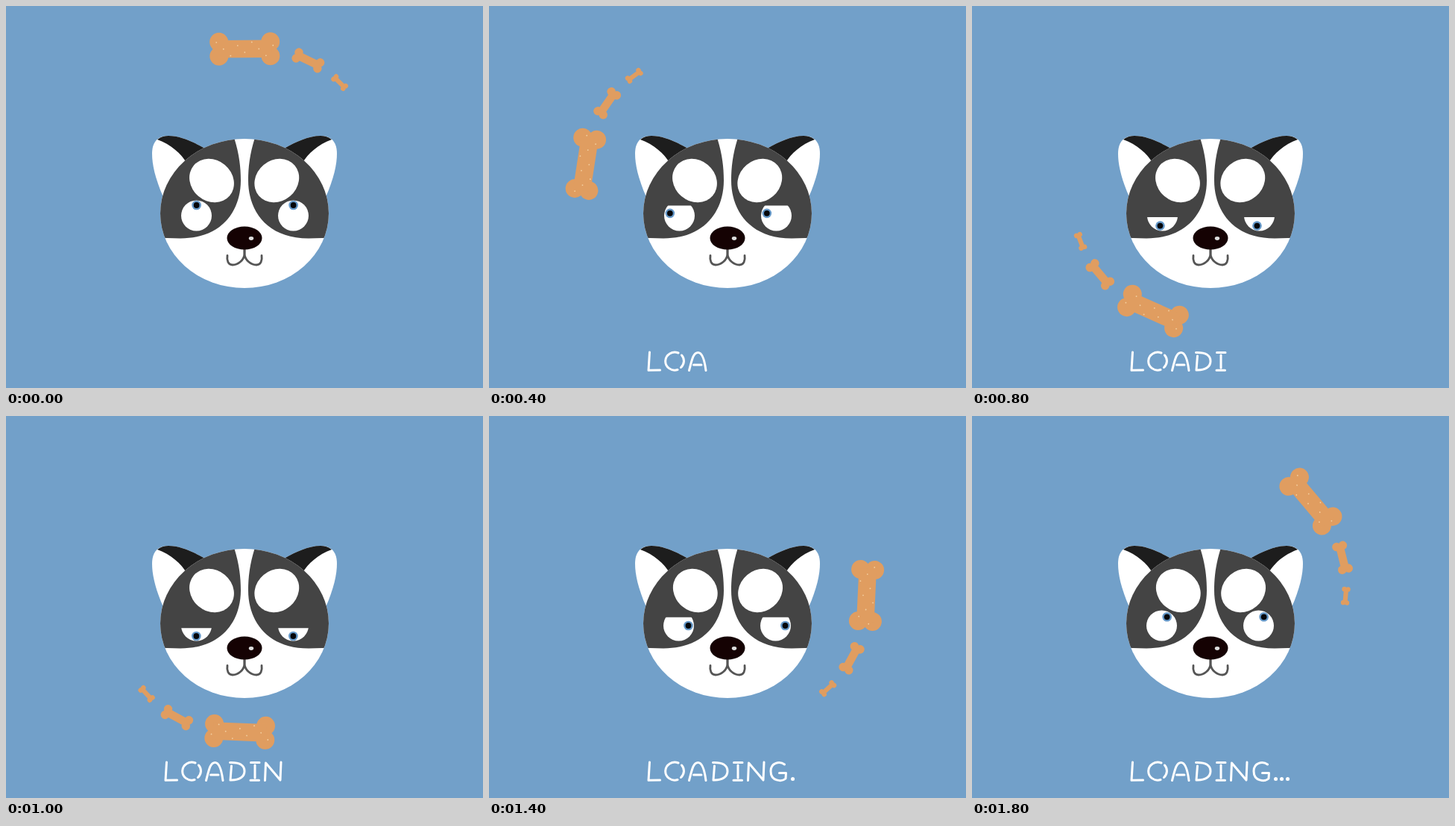
Write an HTML page that moves like this. It is 640x512 px and loops after 2 s.

```html
<!DOCTYPE html>
<html lang="en">
<head>
<meta charset="utf-8">
<title>Loading</title>
<style>
html, body { margin: 0; width: 100%; height: 100%; overflow: hidden; background: #72a0c9; }
svg { display: block; width: 640px; height: 512px; }
.line { fill: none; stroke-linecap: round; stroke-linejoin: round; }
</style>
</head>
<body>
<svg viewBox="0 0 640 512" role="img" aria-label="LOADING...">
  <defs>
    <clipPath id="skull"><ellipse cx="320" cy="278" rx="113" ry="100"/></clipPath>
    <clipPath id="open"><rect id="lid" x="200" width="240" height="60"/></clipPath>
    <g id="bone">
      <circle cx="-34.5" cy="-9.5" r="12.5"/><circle cx="-34.5" cy="9.5" r="12.5"/>
      <circle cx="34.5" cy="-9.5" r="12.5"/><circle cx="34.5" cy="9.5" r="12.5"/>
      <rect x="-36" y="-11.8" width="72" height="23.6"/>
    </g>
    <g id="ear">
      <path fill="#fff" d="M211 256C200 231 196 212 196 198C196 184 202 174 218 174C234 174 251 182 267 191L260 240Z"/>
      <path fill="#1d1d1d" d="M203 179C208 175 213 174 218 174C234 174 251 182 267 191L262 210H242C235 198 222 186 203 179Z"/>
    </g>
    <path id="patch" fill="#444" d="M306.5 170V178C313 199 315 216 315 234C315 272 292 311.500 234 311.500L200 310.500V170Z"/>
    <ellipse id="brow" cx="276" cy="234" rx="31.500" ry="27.500" transform="rotate(40 276 234)"/>
    <path id="lip" d="M320 326V333C319 341 311 347 304 347C298 347 296 341 297 334.500"/>
    <g id="eye">
      <circle id="white" cx="255.500" cy="281" r="20.500" fill="#fff"/>
      <g id="pupil"><circle r="6.300" fill="#6598c8"/><circle r="3.900" fill="#05060a"/></g>
    </g>
  </defs>

  <g id="bones" fill="#e09d60">
    <use href="#bone"/>
    <g id="specks" fill="#f3cfa0"></g>
    <use href="#bone" transform="translate(85 16) rotate(26) scale(.46)"/>
    <use href="#bone" transform="translate(127 46) rotate(45) scale(.26)"/>
  </g>

  <use href="#ear"/>
  <use href="#ear" transform="matrix(-1 0 0 1 640 0)"/>
  <g clip-path="url(#skull)">
    <rect x="200" y="170" width="240" height="215" fill="#fff"/>
    <use href="#patch"/>
    <use href="#patch" transform="matrix(-1 0 0 1 640 0)"/>
  </g>
  <g id="brows" fill="#fff">
    <use href="#brow"/>
    <use href="#brow" transform="matrix(-1 0 0 1 639.3 0)"/>
  </g>
  <g clip-path="url(#open)">
    <use href="#eye"/>
    <use href="#eye" x="130"/>
  </g>
  <g class="line" stroke="#555" stroke-width="2.800">
    <use href="#lip"/>
    <use href="#lip" transform="matrix(-1 0 0 1 640 0)"/>
  </g>
  <ellipse cx="320" cy="311" rx="23.500" ry="15.500" fill="#150203"/>
  <ellipse cx="329" cy="311.500" rx="3.200" ry="2.400" fill="#ddd"/>

  <g id="letters" class="line" stroke="#fff" stroke-width="3">
    <path d="M215.500 464L214 488.300L229.500 488"/>
    <path d="M254 465A12.500 12 0 1 0 253 487.500M258.500 468A12.500 12 0 0 1 257.500 484.500"/>
    <path d="M268.500 488.500C272 476 273.500 464.500 280.500 464.500C287 464.500 289.500 477 291 488.500M274.500 481H285"/>
    <path d="M302.500 469L301 488C314 488.500 320 483 320 476C320 468 313 464 300.500 464.500"/>
    <path d="M328.500 464.500H340M334 468V485M328 488.300H339.500"/>
    <path d="M347.500 488.500L348.500 465L368 488L369 464"/>
    <path d="M396.500 467C390 462 378 464.500 378 476C378 490 393 490.500 398 486L398.500 478.500H389.500"/>
    <path d="M407.500 486.500h.1" stroke-width="5"/>
    <path d="M415.500 486.500h.1" stroke-width="5"/>
    <path d="M423.500 486.500h.1" stroke-width="5"/>
  </g>
</svg>
<script>
const $ = id => document.getElementById(id);
const set = (id, name, value) => $(id).setAttribute(name, value);
const { sin, cos, PI } = Math;
const STEP = 200;

// degrees travelled anticlockwise from the top, one stop per step
const stops = [-1, 44, 81, 91, 157, 179, 234, 270, 301, 313.5];

for (let i = 0; i < 9; i++) {
  const x = i * 9.5 - 38, y = (i * 7 % 5 - 2) * 4.5;
  $('specks').innerHTML += `<circle cx="${x}" cy="${y}" r=".9"/>`;
}

const letters = [...$('letters').children];
const start = performance.now();
let shown = -1;

function draw(i) {
  const deg = -stops[i];
  const a = deg * PI / 180;
  const x = 317 + 189.5 * sin(a), y = 240.5 - 183 * cos(a);
  set('bones', 'transform', `translate(${x} ${y}) rotate(${deg * 0.985 - 1.4})`);

  // the face leans slightly once the bones are on its right
  const lean = deg < -180 ? 1 : 0;
  const eyeX = 255.5 - lean;
  const gaze = a - 0.23 * sin(2 * a);
  set('white', 'cx', eyeX);
  set('pupil', 'transform', `translate(${eyeX + 13 * sin(gaze)} ${281 - 14 * cos(gaze)})`);
  set('lid', 'y', 269.7 - 14.5 * cos(a));
  set('brows', 'transform', `translate(${lean * 0.8} 0)`);

  const count = i && i + 1;
  letters.forEach((el, n) => el.setAttribute('visibility', n < count ? 'visible' : 'hidden'));
}

function tick() {
  const i = Math.floor((performance.now() - start) / STEP) % stops.length;
  if (i !== shown) draw(shown = i);
  requestAnimationFrame(tick);
}
tick();
</script>
</body>
</html>
```
